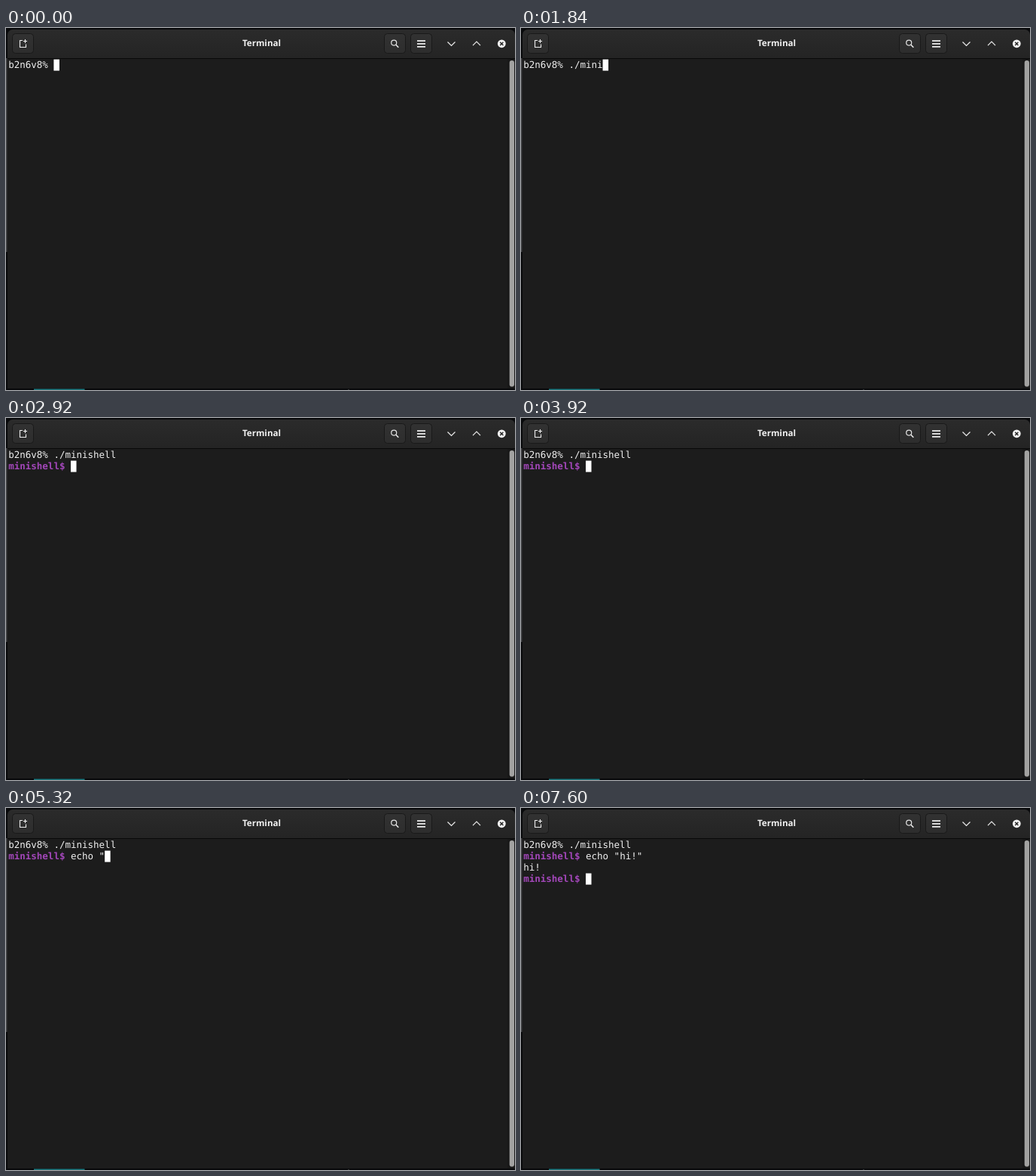
Recreate the animation shown at these times as an HTML page with a canvas. Size 676x480 px, loop 8000 ms.

```html
<!DOCTYPE html>
<html lang="en">
<head>
<meta charset="utf-8">
<title>Terminal</title>
<style>
  html, body { margin: 0; width: 676px; height: 480px; overflow: hidden; background: #08090b; }
  body { position: relative; text-rendering: geometricPrecision; }
  canvas, h1, pre { position: absolute; margin: 0; }
  canvas { left: 0; top: 0; }
  h1 {
    left: 239.5px; top: 10px; width: 200px; text-align: center; color: #f2f2f2;
    font: bold 11.6px/21px "Noto Sans", "Open Sans", sans-serif;
  }
  pre {
    left: 3.2px; top: 41px; color: #f0f0f0;
    font: 12.5px/15px "DejaVu Sans Mono", monospace;
  }
  b { color: #a347ba; }
</style>
</head>
<body>
<canvas id="stage" width="676" height="480"></canvas>
<h1>Terminal</h1>
<pre id="screen"></pre>
<script>
const LOOP = 8000;
const CELL = { w: 7.525, h: 15, x: 3.2, y: 41.6 };
const HOST = 'b2n6v8% ';
const PROMPT = 'minishell$ ';
const COMMANDS = [
  { text: './minishell', keys: [480, 880, 1480, 1640, 1760, 1840, 2040, 2120, 2280, 2440, 2600], enter: 2920 },
  { text: 'echo "hi!"', keys: [3960, 4240, 4480, 4680, 5000, 5320, 5880, 6000, 6640, 7320], enter: 7600 }
];
const BLINK = [3480, 3920];

const ctx = document.getElementById('stage').getContext('2d');
const screen = document.getElementById('screen');

function rect(x, y, w, h, color) {
  ctx.fillStyle = color;
  ctx.fillRect(x, y, w, h);
}

function round(x, y, w, h, r, fill, stroke) {
  ctx.beginPath();
  ctx.roundRect(x, y, w, h, r);
  if (fill) { ctx.fillStyle = fill; ctx.fill(); }
  if (stroke) { ctx.strokeStyle = stroke; ctx.lineWidth = 1; ctx.stroke(); }
}

function line(points, width, color = '#ededed') {
  ctx.beginPath();
  points.forEach(([x, y]) => ctx.lineTo(x, y));
  ctx.strokeStyle = color;
  ctx.lineWidth = width;
  ctx.stroke();
}

function shade(top, bottom, y0, y1) {
  const g = ctx.createLinearGradient(0, y0, 0, y1);
  g.addColorStop(0, top);
  g.addColorStop(1, bottom);
  return g;
}

function button(x) {
  round(x + 0.5, 7.5, 28, 26, 4, shade('#323232', '#2d2d2d', 7, 34), '#191919');
}

function drawIcons() {
  // new tab
  line([[22, 16.5], [18.5, 16.5], [18.5, 25.5], [26.5, 25.5], [26.5, 21.5]], 1.1);
  line([[25.5, 15], [25.5, 20]], 1.1);
  line([[23, 17.5], [28, 17.5]], 1.1);
  // search
  ctx.beginPath();
  ctx.arc(515.2, 19.6, 3.5, 0, Math.PI * 2);
  ctx.strokeStyle = '#e4e4e4';
  ctx.lineWidth = 1.2;
  ctx.stroke();
  line([[517.8, 22.2], [521.3, 25.7]], 1.5);
  // menu
  for (const y of [16.2, 20.1, 24]) rect(546, y, 11, 1.7, '#f2f2f2');
  // minimise and maximise
  line([[586.5, 18.5], [591.5, 23.5], [596.5, 18.5]], 1.2);
  line([[620, 23.2], [625, 18.2], [630, 23.2]], 1.2);
  // close
  ctx.beginPath();
  ctx.arc(658.3, 20.8, 5.4, 0, Math.PI * 2);
  ctx.fillStyle = '#f4f4f4';
  ctx.fill();
  line([[656.2, 18.7], [660.4, 22.9]], 1.4, '#242424');
  line([[660.4, 18.7], [656.2, 22.9]], 1.4, '#242424');
}

function drawWindow() {
  rect(0, 0, 676, 480, '#08090b');
  rect(0, 40, 1.5, 257, '#48494b');
  round(2, 2, 674, 38, [7, 7, 0, 0], shade('#2b2b2b', '#242424', 2, 40));
  rect(2, 40, 674, 1, '#090909');
  rect(2, 41, 674, 437, '#1c1c1c');
  rect(666, 41, 10, 437, '#181818');
  round(668.7, 43, 6.3, 432.5, 3.1, '#a2a2a1');
  rect(37, 478.5, 67.5, 1.5, '#1c7a80');
  rect(454, 479, 2, 1, '#303234');
  [8, 502, 537].forEach(button);
  drawIcons();
}

function sessionAt(t) {
  const [launch, echo] = COMMANDS.map(c => c.text.slice(0, c.keys.filter(k => k <= t).length));
  const lines = [HOST + launch];
  if (t >= COMMANDS[0].enter) lines.push(PROMPT + echo);
  if (t >= COMMANDS[1].enter) lines.push('hi!', PROMPT);
  return lines;
}

let shown = '';
function draw(now) {
  const t = now % LOOP;
  const lines = sessionAt(t);
  const text = lines.join('\n');
  if (text !== shown) {
    screen.innerHTML = text.replaceAll(PROMPT, `<b>${PROMPT}</b>`);
    shown = text;
  }
  drawWindow();
  if (t < BLINK[0] || t >= BLINK[1]) {
    const row = lines.length - 1;
    rect(CELL.x + lines[row].length * CELL.w, CELL.y + row * CELL.h, CELL.w, CELL.h, '#ffffff');
  }
}

let start;
function tick(now) {
  start ??= now;
  draw(now - start);
  requestAnimationFrame(tick);
}
draw(0);
requestAnimationFrame(tick);
</script>
</body>
</html>
```
